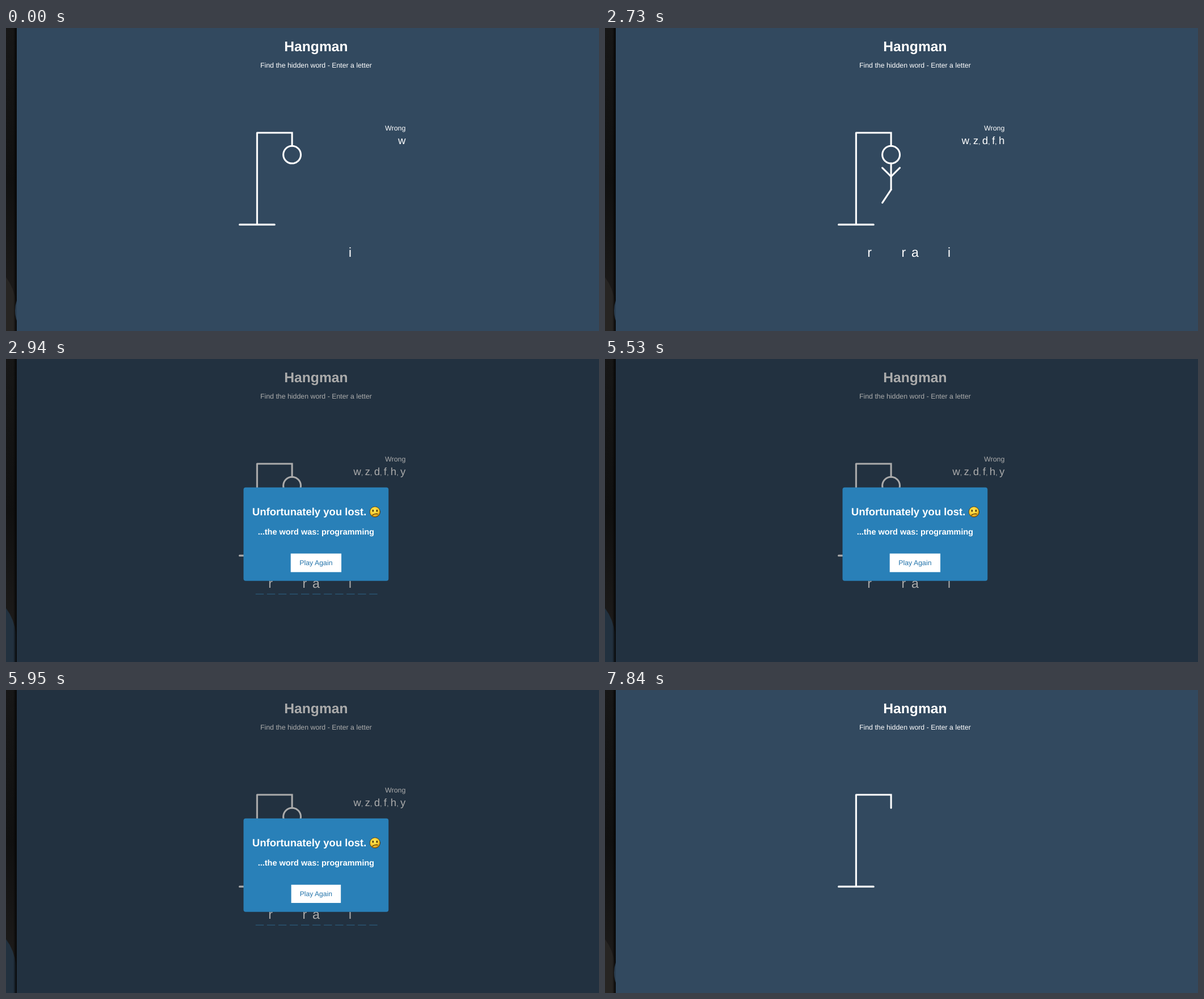
These frames come from a looping animation (1047 by 535 pixels, 8 s). An HTML page:

```html
<!DOCTYPE html>
<html lang="en">
<head>
<meta charset="utf-8">
<title>Hangman</title>
<style>
  html, body { margin: 0; width: 100%; height: 100%; overflow: hidden; background: #32495f; }
  svg { display: block; width: 1047px; height: 535px; }
  text { font: 12.35px "Liberation Sans", Arial, sans-serif; fill: #fff; text-anchor: middle; text-rendering: geometricPrecision; }
  .bold { font-weight: bold; }
  .figure { fill: none; stroke: #fff; stroke-width: 4; stroke-linecap: round; }
  #word text { font-size: 23.16px; }
  #wrong text { text-anchor: end; }
  #wrong tspan { font-size: 18.53px; }
</style>
</head>
<body>
<svg viewBox="0 0 1047 535">
  <defs>
    <linearGradient id="wall" x2="0" y2="1">
      <stop offset="0" stop-color="#171717"/>
      <stop offset=".5" stop-color="#101010"/>
      <stop offset="1" stop-color="#201e1d"/>
    </linearGradient>
    <linearGradient id="edge">
      <stop offset="0" stop-color="#000" stop-opacity="0"/>
      <stop offset="1" stop-color="#080808"/>
    </linearGradient>
    <radialGradient id="face" cx=".42" cy=".35" r=".65">
      <stop offset="0" stop-color="#ffe85a"/>
      <stop offset=".7" stop-color="#f8c62a"/>
      <stop offset="1" stop-color="#b87b10"/>
    </radialGradient>
  </defs>

  <rect width="1047" height="535" fill="#32495f"/>
  <text class="bold" x="547.4" y="40.5" style="font-size:24.7px">Hangman</text>
  <text x="547.4" y="69.7">Find the hidden word - Enter a letter</text>

  <g class="figure" transform="translate(397 169.6) scale(.772)">
    <path d="M60 20H140V50M60 20V230M20 230H100"/>
    <g id="parts">
      <circle cx="140" cy="70" r="20"/>
      <path d="M140 90V150"/>
      <path d="M140 120L120 100"/>
      <path d="M140 120L160 100"/>
      <path d="M140 150L120 180"/>
      <path d="M140 150L160 180"/>
    </g>
  </g>

  <g id="wrong">
    <text x="705.5" y="181">Wrong</text>
    <text x="705.5" y="204.7" id="misses"></text>
  </g>
  <g id="word"></g>

  <rect width="19" height="535" fill="url(#wall)"/>
  <path id="blob" d="M0 440Q14 458 18 486V535H0Z"/>
  <rect x="13" width="6" height="535" fill="url(#edge)"/>
  <path id="sliver" d="M19 481Q13 499 19 517Z" fill="#2b3e50"/>

  <g id="popup">
    <rect x="19" width="1028" height="535" opacity=".33"/>
    <path id="dashes" d="M440.7 415.2H656" stroke="#294f69" stroke-width="1.8" stroke-dasharray="14.4 5.67"/>
    <rect x="419.4" y="226.7" width="256" height="165" rx="3.9" fill="#2980b8"/>
    <text class="bold" x="434.8" y="276" style="font-size:18.53px;text-anchor:start">Unfortunately you lost.</text>
    <g fill="none" stroke="#3c2505" stroke-linecap="round">
      <circle cx="651.5" cy="269.9" r="9.2" fill="url(#face)" stroke-width=".7"/>
      <path d="M648 267v1.8M655 267v1.8" stroke-width="2.2"/>
      <path d="M647 275.8Q651 272.6 656 273.6" stroke-width="1.3"/>
    </g>
    <text class="bold" x="547.4" y="310.3" style="font-size:14.45px">...the word was: programming</text>
    <g id="button">
      <rect x="502.7" y="343.5" width="89.4" height="32.8" fill="#fff"/>
      <text x="547.4" y="364" style="fill:#2273aa">Play Again</text>
    </g>
  </g>
</svg>
<script>
const $ = id => document.getElementById(id);
const LOOP = 8000, LOST = 2940, UNHOVER = 5530, PRESS = 5950, RESET = 6020;
const misses = [["w", 0], ["z", 560], ["d", 1610], ["f", 2380], ["h", 2730], ["y", LOST]];
const shownAt = { i: 0, a: 770, r: 1050 };

const letters = [..."programming"].map((letter, i) => {
  const el = document.createElementNS("http://www.w3.org/2000/svg", "text");
  el.textContent = letter;
  el.setAttribute("x", 547.4 + (i - 5) * 20.07);
  el.setAttribute("y", 404);
  return $("word").appendChild(el);
});

const show = (el, on) => el.setAttribute("visibility", on ? "visible" : "hidden");
const display = (el, on) => { el.style.display = on ? "" : "none"; };

function draw(t) {
  const playing = t < RESET, lost = playing && t >= LOST;
  const guessed = misses.filter(([, at]) => playing && t >= at);
  display($("wrong"), playing);
  $("misses").innerHTML = guessed.map(([letter]) => `<tspan>${letter}</tspan>`).join(", ");
  [...$("parts").children].forEach((part, i) => show(part, i < guessed.length));
  letters.forEach(el => show(el, playing && t >= (shownAt[el.textContent] ?? Infinity)));
  display($("popup"), lost);
  display($("dashes"), t < UNHOVER || t >= PRESS);
  display($("sliver"), !lost);
  $("blob").setAttribute("fill", lost ? "#22313f" : "#272523");
  $("button").setAttribute("transform",
    t >= PRESS ? "translate(547.4 359.9) scale(.98) translate(-547.4 -359.9)" : "");
}

const start = performance.now();
function tick() {
  draw((performance.now() - start) % LOOP);
  requestAnimationFrame(tick);
}
tick();
</script>
</body>
</html>
```
